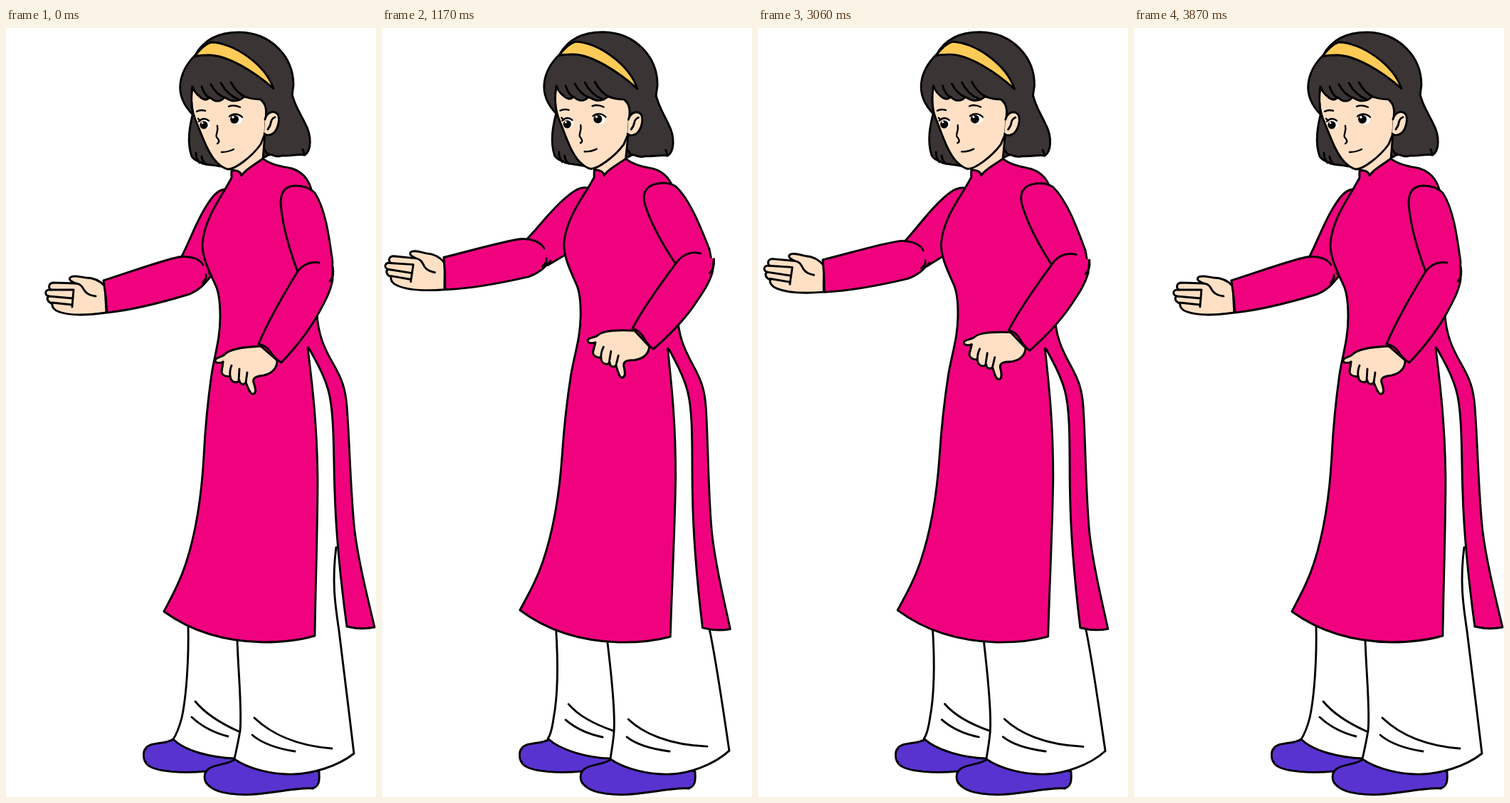
An HTML page with a canvas for the animation above (3900 ms loop, 520x1078 px).

```html
<!DOCTYPE html>
<html lang="en">
<head>
<meta charset="utf-8">
<title>Welcome gesture</title>
<style>
html, body { margin: 0; width: 100%; height: 100%; overflow: hidden; background: #fff; }
canvas { display: block; }
</style>
</head>
<body>
<canvas id="stage" width="520" height="1078"></canvas>
<script>
const ctx = document.getElementById('stage').getContext('2d');
const LOOP = 3900, STEP = 30;
const PINK = '#f0027f', SKIN = '#ffe0c4', HAIR = '#3a3534', GOLD = '#ffcb57', SHOE = '#5833cf';

function draw(d, fill) {
  const path = new Path2D(d);
  if (fill) { ctx.fillStyle = fill; ctx.fill(path); }
  ctx.stroke(path);
}

function dot(x, y, r, color) {
  ctx.fillStyle = color;
  ctx.beginPath();
  ctx.arc(x, y, r, 0, 7);
  ctx.fill();
}

// Blend two paths of the same structure.
function mix(a, b, p) {
  const ends = b.match(/\d+/g);
  let i = 0;
  return a.replace(/\d+/g, n => (+n + (ends[i++] - n) * p).toFixed(2) + ' ');
}

// Draw a part shifted by (dx, dy) and turned about its pivot; the lift lags, so arms swing on an arc.
function pose(p, [x, y, dx, dy, turn], part) {
  ctx.save();
  ctx.translate(x + dx * p, y + dy * p ** 1.3);
  ctx.rotate(turn * p);
  ctx.translate(-x, -y);
  part();
  ctx.restore();
}

const BODY = [350, 490, -24, 0, .0158];
const FAR_UPPER = [308, 226, -19.5, -2, .307];
const FAR_FORE = [137, 354, -52, -34, .07];
const NEAR_UPPER = [405, 222, -23.5, -2, -.25];
const NEAR_FORE = [355, 443, -3, -23, .103];

function shoes() {
  draw('M235 997C226 1004 206 1001 199 1007C191 1013 192 1026 199 1033C210 1043 250 1045 280 1042C297 1038 310 1031 323 1027L320 1012Z', SHOE);
  draw('M322 1025C314 1032 296 1032 287 1037C276 1043 277 1056 286 1063C298 1074 330 1076 352 1074C385 1071 415 1064 431 1066C440 1063 441 1056 440 1042L380 1030Z', SHOE);
}

const LEGS = [
  ['M256 838C257 880 254 935 247 967C243 982 239 991 235 997C252 1014 290 1023 322 1024L345 1024L345 838',
   'M244 840C247 885 247 935 241 967C239 982 237 991 233 996C251 1013 290 1023 321 1024L345 1024L345 838'],
  ['M325 856C326 900 332 955 329 985C326 1003 323 1015 321 1025C342 1039 375 1047 405 1046C430 1045 465 1036 489 1017C482 960 474 890 468 845C462 805 458 775 464 728',
   'M316 856C320 890 328 950 326 985C325 1003 322 1015 321 1025C342 1039 375 1047 405 1046C430 1045 465 1034 488 1013C480 960 470 890 460 843C456 815 450 790 450 740']
];
const FOLDS = [
  'M266 944C280 961 300 974 327 986M261 966C275 979 292 988 312 993M349 967C370 987 405 1006 458 1010M346 991C360 1003 380 1010 406 1014',
  'M262 948C275 963 298 976 325 985M258 970C272 982 290 990 310 994M346 969C366 988 402 1005 457 1007M344 994C358 1005 380 1011 404 1014'
];

function trousers(p) {
  for (const [a, b] of LEGS) draw(mix(a, b, p), '#fff');
  draw(mix(...FOLDS, p));
}

function farUpper() {
  draw('M330 300L306 324L286 346L247 320C258 299 266 275 280 252C288 239 296 227 308 226L320 224', PINK);
}

function farFore() {
  draw('M139 362C132 354 124 350 112 350C104 349 94 346 90 350C88 354 92 355 98 358L66 357C60 358 59 364 63 367C55 366 53 374 60 376C56 379 59 385 65 386C64 391 68 396 75 398C92 404 120 402 141 399Z', SKIN);
  draw('M98 358C106 359 107 363 111 369C115 374 120 375 126 376M62 367L95 367L93 391M60 376L94 379M65 385L93 388');
  draw('M277 332C272 323 258 319 243 321C215 327 175 342 137 354Q141 376 142 399C180 395 225 383 258 373C272 367 278 360 287 349', PINK);
  draw('M281 346C282 350 280 354 276 357');
}

function dress() {
  draw('M424 448C431 505 437 555 438 630C438 700 435 780 434 852C410 859 386 861 361 861C310 860 262 847 222 818'
    + 'C234 795 245 775 253 750C266 710 275 655 278 600C280 560 284 520 289 485C294 455 301 435 301 405'
    + 'C301 390 300 375 296 364C288 345 276 325 276 303C278 275 293 250 308 226L317 210L317 199'
    + 'C325 200 330 201 331 207C336 198 351 191 361 183C372 192 388 194 402 197C417 202 425 212 429 226L440 300L437 398'
    + 'C438 430 448 450 460 471C472 492 477 505 479 530C483 580 484 650 490 705C495 745 506 790 518 840Q500 844 479 839'
    + 'C471 780 464 720 462 650C460 600 462 540 453 508C446 482 434 465 427 451Q424 447 424 448Z', PINK);
}

function face() {
  draw('M364 148L361 184L332 208L317 206L318 194', SKIN);
  draw('M262 82C259 100 261 118 268 133C276 152 284 176 296 188C302 194 307 197 312 198C322 198 345 181 358 163L364 148L366 110L350 90Z', SKIN);
  dot(281, 135, 6, '#fff');
  dot(325, 128, 7, '#fff');
  dot(278, 136, 5.6, '#000');
  dot(321, 128, 6, '#000');
  dot(276, 133, 1.5, '#fff');
  dot(319, 125, 1.7, '#fff');
  ctx.save();
  ctx.lineWidth = 2.4;
  draw('M271 131C275 127 280 126 285 130M270 127L273 130M314 124C318 120 326 119 332 125M268 117Q273 114 280 116M313 110Q320 107 329 111');
  draw('M297 137C299 145 294 149 296 153C299 156 301 160 297 162M303 174Q312 174 320 170');
  ctx.restore();
}

function head() {
  draw('M263 118C258 138 254 160 261 180C266 188 272 186 276 190C284 192 291 192 302 194L300 130', HAIR);
  draw('M402 92C405 108 414 120 421 135C430 152 429 172 420 178C410 176 403 180 388 179C380 182 376 178 370 177C367 180 363 181 358 183L364 150L366 100', HAIR);
  draw('M267 175Q267 184 272 189M275 180Q276 187 281 191M364 171Q366 176 370 178M417 170Q419 174 419 178');
  face();
  draw('M366 124C366 112 364 103 357 100C350 100 340 98 335 96C331 100 327 102 322 102C316 103 311 99 307 97C304 102 298 103 294 102C290 101 288 98 286 97C283 102 277 101 272 96C267 92 264 88 262 82C259 100 261 112 263 122C252 111 243 96 245 78C247 60 256 48 266 38C276 20 295 6 327 6C372 6 404 40 404 80L402 95', HAIR);
  draw('M275 82Q279 94 286 98M288 79Q295 93 308 98M302 77Q311 94 327 100M316 76Q324 91 337 97');
  draw('M265 40C272 30 279 23 288 20C318 20 364 50 376 85C350 62 312 38 285 38C277 38 271 38 265 40Z', GOLD);
  draw('M364 128C367 117 377 115 382 121C386 130 381 146 373 149C369 151 365 150 363 148', SKIN);
  draw('M378 125C371 128 373 133 371 137L368 142');
}

function nearUpper() {
  draw('M410 342C400 315 390 283 387 255C384 236 388 222 406 221C418 221 427 224 434 231C450 255 455 300 459 328L458 347', PINK);
}

function nearFore() {
  draw('M294 467C293 462 302 462 307 458C314 449 338 447 358 446L381 466C381 477 374 484 362 487C352 488 346 490 348 497C350 503 353 511 348 513C343 515 340 503 337 497C334 501 328 499 328 494C325 498 316 498 315 488C311 489 303 488 303 481L305 468C301 470 295 470 294 467Z', SKIN);
  draw('M305 468L303 481M317 473Q314 480 315 489M328 478L327 494M339 483L337 497');
  draw('M440 329C427 327 417 332 410 341C391 372 370 407 355 443Q365 445 371 453Q379 465 387 469C405 450 425 425 437 404C448 384 456 370 459 353L459 335', PINK);
  draw('M459 335Q462 348 455 355');
}

function render(p) {
  ctx.fillStyle = '#fff';
  ctx.fillRect(0, 0, 520, 1078);
  ctx.strokeStyle = '#000';
  ctx.lineWidth = 2.9;
  ctx.lineCap = ctx.lineJoin = 'round';
  shoes();
  trousers(p);
  pose(p, FAR_UPPER, farUpper);
  pose(p, FAR_FORE, farFore);
  pose(p, BODY, () => { head(); dress(); });
  pose(p, NEAR_UPPER, nearUpper);
  pose(p, NEAR_FORE, nearFore);
}

// Steep in the middle, with long slow tails.
function ease(t, mid, spread) {
  const z = (t - mid) / spread;
  return .5 + .5 * z / Math.hypot(1, z);
}

function tick(now) {
  const t = Math.floor(now % LOOP / STEP) * STEP;
  render(Math.max(0, ease(t, 1047, 48) - ease(t, 3158, 81)));
  requestAnimationFrame(tick);
}
tick(performance.now());
</script>
</body>
</html>
```
